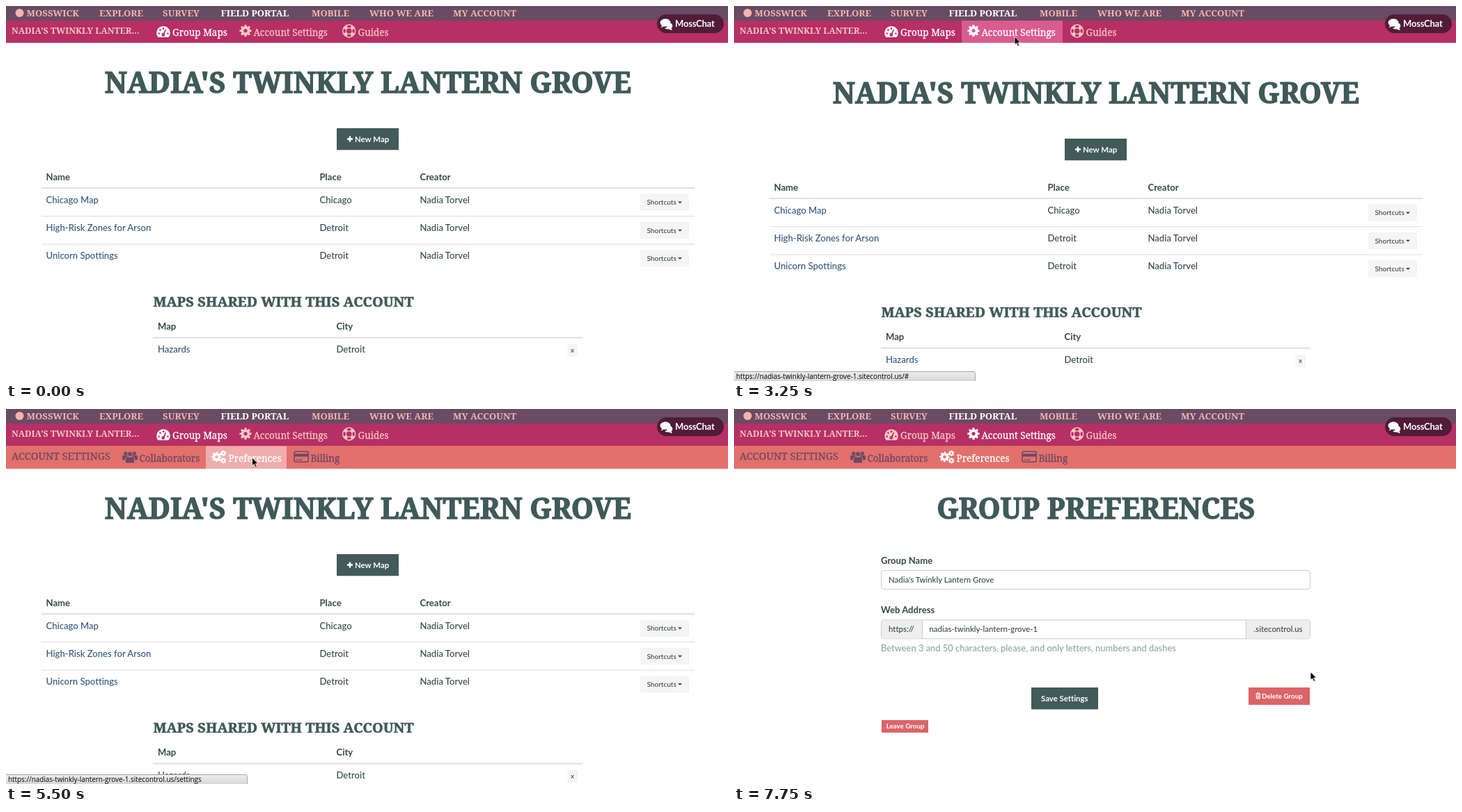
These frames come from a looping animation (1037x540 px, 8 s). An HTML page:

```html
<!DOCTYPE html>
<html lang="en">
<head>
<meta charset="utf-8">
<title>Group preferences</title>
<style>
html, body { margin: 0; width: 100%; height: 100%; overflow: hidden; background: #fff; }
svg.stage { display: block; width: 100vw; height: 100vh; }
text { white-space: pre; font-variant-ligatures: none; }

.slab { font-family: "Noto Serif", serif; font-size: 13.1px; }
.menu { font-weight: 700; fill: #f3b5ac; }
.menu .on { fill: #fff; }
.bar { fill: currentColor; font-size: 13.5px; }
.bar text { stroke: currentColor; stroke-width: .3px; }
.group { font-weight: 700; font-size: 12.4px; }
.title { font-weight: 700; font-size: 40.8px; text-anchor: middle; stroke-width: 1.3px; }
.sub { font-weight: 700; font-size: 20px; stroke-width: .6px; }
.title, .sub { fill: #3f5a59; stroke: #3f5a59; }
.lato { font-family: Lato, sans-serif; font-size: 13.1px; font-weight: 500; fill: #34494a; }
.b { font-weight: 700; }
.link { fill: #33587c; }
.field { font-size: 11.4px; }
.hint { fill: #8ca5a2; font-size: 12.9px; }
.btn { font-weight: 700; font-size: 11.4px; fill: #fff; }
.small { font-size: 9.8px; }
.url { font-family: "Open Sans", sans-serif; font-size: 9.9px; fill: #000; }
.rule { fill: #dcdcdc; }
.box { fill: #fff; stroke: #ccc; }
.dark { fill: #425a59; }
.red { fill: #db6468; }

.pink { color: #f6c6c1; }
.plum { color: #6d4865; }
.line { fill: none; stroke: currentColor; }

/* every change is a hard step on a 250 ms grid (3.125%) */
.anim { animation: 8s step-end infinite; }
.cursor { animation-name: cursor; }
.list { animation-name: list; }
.form { animation-name: form; }
.sub-bar { animation-name: sub-bar; }
.maps { animation-name: maps; }
.account { animation-name: account; }
.account-bg { animation-name: account-bg; }
.prefs { animation-name: prefs; }
.prefs-bg { animation-name: prefs-bg; }
.billing { animation-name: billing; }
.billing-bg { animation-name: billing-bg; }
.status { animation-name: status; }
.url-hash { animation-name: url-hash; }
.url-set { animation-name: url-set; }
.url-bill { animation-name: url-bill; }

@keyframes cursor {
  0% { visibility: hidden; transform: translate(533px, 19px); }
  6.25% { visibility: visible; transform: translate(533px, 19px); }
  9.375% { transform: translate(456px, 82px); }
  12.5% { transform: translate(406px, 67px); }
  15.625% { transform: translate(416px, 42px); }
  18.75% { transform: translate(419px, 38px); }
  21.875% { transform: translate(418.5px, 39px); }
  34.375% { transform: translate(409px, 43px); }
  37.5% { transform: translate(402.5px, 43.5px); }
  53.125% { transform: translate(376px, 57px); }
  56.25% { transform: translate(354.5px, 69px); }
  59.375% { transform: translate(353px, 69.5px); }
  90.625% { transform: translate(440px, 68px); }
  93.75% { transform: translate(827.5px, 377px); }
  96.875% { visibility: visible; transform: translate(827.5px, 378px); }
}
@keyframes list {
  0% { visibility: visible; transform: none; }
  40.625% { transform: translateY(15px); }
  43.75% { transform: translateY(31px); }
  46.875% { transform: translateY(33px); }
  75% { visibility: hidden; }
}
@keyframes form { 0% { visibility: hidden; } 75% { visibility: visible; } }
@keyframes sub-bar { 0% { opacity: 0; } 43.75% { opacity: .7; } 46.875% { opacity: 1; } }
@keyframes maps { 0% { color: #fff; } 75% { color: #f6c6c1; } }
@keyframes account {
  0% { color: #f6c6c1; }
  34.375% { color: #fae0dd; }
  37.5% { color: #fff; }
  56.25% { color: #f6cdc9; }
  59.375% { color: #f6c6c1; }
  75% { color: #fff; }
}
@keyframes account-bg {
  0% { opacity: 0; }
  34.375% { opacity: .08; }
  37.5% { opacity: .85; }
  40.625% { opacity: 1; }
  56.25% { opacity: .35; }
  59.375% { opacity: .1; }
  62.5% { opacity: 0; }
}
@keyframes prefs { 0% { color: #6d4865; } 56.25% { color: #fff; } }
@keyframes prefs-bg {
  0% { opacity: 0; }
  56.25% { opacity: .66; }
  59.375% { opacity: .85; }
  62.5% { opacity: .93; }
  65.625% { opacity: .97; }
  68.75% { opacity: 1; }
  93.75% { opacity: .4; }
  96.875% { opacity: 0; }
}
@keyframes billing {
  0% { color: #6d4865; }
  90.625% { color: #f6dcdb; }
  93.75% { color: #a5727f; }
  96.875% { color: #6d4865; }
}
@keyframes billing-bg {
  0% { opacity: 0; }
  90.625% { opacity: .08; }
  93.75% { opacity: .4; }
  96.875% { opacity: 0; }
}
@keyframes status {
  0% { opacity: 0; }
  34.375% { opacity: .6; }
  37.5% { opacity: 1; }
  96.875% { opacity: 0; }
}
@keyframes url-hash { 0% { visibility: visible; } 56.25% { visibility: hidden; } }
@keyframes url-set { 0% { visibility: hidden; } 56.25% { visibility: visible; } 90.625% { visibility: hidden; } }
@keyframes url-bill { 0% { visibility: hidden; } 90.625% { visibility: visible; } }
</style>
</head>
<body>
<svg class="stage" viewBox="0 0 1037 540" preserveAspectRatio="none">
  <defs>
    <linearGradient id="grey" x2="0" y2="1">
      <stop stop-color="#ededed"/><stop offset="1" stop-color="#d6d6d6"/>
    </linearGradient>
    <g id="gear" class="line">
      <circle r="4.6" stroke-width="4"/>
      <circle r="7.2" stroke-width="2.8" pathLength="16" stroke-dasharray="1 1" stroke-dashoffset=".5"/>
    </g>
    <g id="person" fill="currentColor">
      <circle r="3.6" cy="-4.6"/>
      <path d="M-6.5 7V3.5Q-6.5-1-3-1Q0 1 3-1Q6.5-1 6.5 3.5V7Q6.5 8.5 4.5 8.5H-4.5Q-6.5 8.5-6.5 7Z"/>
    </g>
    <g id="shortcuts">
      <rect x="911" y="270.5" width="70" height="24.5" fill="#f5f5f5"/>
      <text class="lato" x="920.5" y="286.3" style="font-size:10px">Shortcuts</text>
      <path d="M965 281.5h6l-3 3z" fill="#34494a"/>
    </g>
  </defs>
  <rect width="1037" height="540" fill="#fff"/>

  <g class="anim list">
    <text class="slab title" x="520" y="125.3">NADIA'S TWINKLY LANTERN GROVE</text>
    <rect class="dark" x="475" y="176" width="89" height="31.3"/>
    <path d="M490 191.5h8M494 187.5v8" stroke="#fff" stroke-width="2.4"/>
    <text class="lato btn" x="501" y="195.7">New Map</text>

    <g class="lato b">
      <text x="57.5" y="250.5">Name</text>
      <text x="450.5" y="250.5">Place</text>
      <text x="594.5" y="250.5">Creator</text>
      <text x="218" y="466">Map</text>
      <text x="474.5" y="466">City</text>
    </g>
    <g class="rule">
      <rect x="51" y="261.3" width="938" height="1.7"/>
      <rect x="51" y="302.2" width="938" height="1"/>
      <rect x="51" y="342.6" width="938" height="1"/>
      <rect x="211" y="476.8" width="617" height="1.7"/>
    </g>
    <g class="lato">
      <text class="link" x="57.5" y="283.7">Chicago Map</text>
      <text x="450.5" y="283.7">Chicago</text>
      <text x="594.5" y="283.7">Nadia Torvel</text>
      <text class="link" x="57.5" y="324">High-Risk Zones for Arson</text>
      <text x="450.5" y="324">Detroit</text>
      <text x="594.5" y="324">Nadia Torvel</text>
      <text class="link" x="57.5" y="364.3">Unicorn Spottings</text>
      <text x="450.5" y="364.3">Detroit</text>
      <text x="594.5" y="364.3">Nadia Torvel</text>
      <text class="link" x="218" y="499">Hazards</text>
      <text x="474.5" y="499">Detroit</text>
    </g>
    <use href="#shortcuts"/>
    <use href="#shortcuts" y="40.3"/>
    <use href="#shortcuts" y="80.6"/>
    <text class="slab sub" x="211.5" y="432.7">MAPS SHARED WITH THIS ACCOUNT</text>
    <rect x="806" y="487" width="15" height="17.5" fill="#f5f5f5"/>
    <text class="lato" x="813.5" y="499" text-anchor="middle" style="font-size:10px">x</text>
  </g>

  <g class="anim form">
    <text class="slab title" x="520" y="158.3">GROUP PREFERENCES</text>
    <text class="lato b" x="211" y="222.5">Group Name</text>
    <rect class="box" x="211.5" y="232.5" width="616" height="27" rx="3.5"/>
    <text class="lato b" x="211" y="294">Web Address</text>
    <rect class="box" x="211.5" y="303.8" width="616" height="27" rx="3.5"/>
    <path d="M270 304.3h-55q-3 0-3 3v20q0 3 3 3h55zM736 304.3h88q3 0 3 3v20q0 3-3 3h-88z" fill="#eee"/>
    <path d="M270.5 304v27M735.5 304v27" stroke="#ccc"/>
    <g class="lato field">
      <text x="222" y="250">Nadia's Twinkly Lantern Grove</text>
      <text x="222" y="321.3">https://</text>
      <text x="280.5" y="321.3">nadias-twinkly-lantern-grove-1</text>
      <text x="746.5" y="321.3">.sitecontrol.us</text>
    </g>
    <text class="lato hint" x="211" y="349.4">Between 3 and 50 characters, please, and only letters, numbers and dashes</text>
    <rect class="dark" x="427" y="401" width="96" height="31.5"/>
    <text class="lato btn" x="441" y="420.8">Save Settings</text>
    <rect class="red" x="739" y="401" width="88" height="25"/>
    <path d="M749 410.5h7.5M751.3 410v-1.2h3v1.2M750.3 411.5v5.6h5v-5.6M752 412v4.5M753.7 412v4.5" fill="none" stroke="#fff"/>
    <text class="lato btn small" x="758" y="416.8">Delete Group</text>
    <rect class="red" x="212" y="448" width="67" height="18"/>
    <text class="lato btn small" x="218.7" y="460.4">Leave Group</text>
  </g>

  <g class="anim sub-bar slab">
    <rect y="53" width="1037" height="33" fill="#e2706c"/>
    <rect class="anim prefs-bg" x="287" y="53.5" width="116" height="32.5" fill="#efadab"/>
    <rect class="anim billing-bg" x="405" y="53.5" width="82" height="32.5" fill="#efadab"/>
    <g class="bar plum">
      <text x="8" y="72.6" style="font-size:14.5px">ACCOUNT SETTINGS</text>
      <use href="#person" transform="translate(171.8 67.3) scale(.72)"/>
      <use href="#person" transform="translate(184.2 67.3) scale(.72)"/>
      <use href="#person" transform="translate(178 69.5)" stroke="#e2706c"/>
      <text x="191.5" y="75.6">Collaborators</text>
    </g>
    <g class="bar anim prefs">
      <use href="#gear" transform="translate(302.5 69) scale(.86)"/>
      <use href="#gear" transform="translate(312.2 63.7) scale(.5)"/>
      <use href="#gear" transform="translate(312.2 74.3) scale(.5)"/>
      <text x="319.5" y="75.6">Preferences</text>
    </g>
    <g class="bar anim billing">
      <rect class="line" x="414.2" y="61.2" width="20" height="15" rx="1.5" stroke-width="1.6"/>
      <path d="M414 64.5h20.5v4H414zM416.5 72.5h2.5v1.5h-2.5zM420.5 72.5h4.5v1.5h-4.5z"/>
      <text x="437.5" y="75.6">Billing</text>
    </g>
  </g>

  <g class="slab">
    <rect width="1037" height="21" fill="#694b64"/>
    <g class="menu">
      <circle cx="19.5" cy="10" r="6"/>
      <text x="29.5" y="14.7">MOSSWICK</text>
      <text x="134" y="14.7">EXPLORE</text>
      <text x="225" y="14.7">SURVEY</text>
      <text class="on" x="308.5" y="14.7">FIELD PORTAL</text>
      <text x="439" y="14.7">MOBILE</text>
      <text x="522" y="14.7">WHO WE ARE</text>
      <text x="642" y="14.7">MY ACCOUNT</text>
    </g>
    <rect y="21" width="1037" height="32" fill="#b62f65"/>
    <rect class="anim account-bg" x="327" y="21" width="145" height="32" fill="#da5b8f"/>
    <text class="bar group pink" x="8" y="39.5">NADIA'S TWINKLY LANTER...</text>
    <g class="bar anim maps">
      <path d="M218.5 45A9.8 9.8 0 1 1 233.5 45Z"/>
      <g fill="#b62f65">
        <circle cx="219.6" cy="39.5" r="1.3"/><circle cx="221.5" cy="34.6" r="1.3"/>
        <circle cx="226" cy="32.4" r="1.3"/><circle cx="232.4" cy="39.5" r="1.3"/>
        <circle cx="225.8" cy="41.5" r="2.4"/>
        <path d="M225.2 41l3.5-7.5 1.4.5-2.8 7.5z"/>
      </g>
      <text x="239" y="43">Group Maps</text>
    </g>
    <g class="bar anim account">
      <use href="#gear" x="344" y="35.6"/>
      <text x="355.5" y="43">Account Settings</text>
    </g>
    <g class="bar pink">
      <g class="line">
        <circle cx="492.7" cy="36" r="9" stroke-width="1.4"/>
        <circle cx="492.7" cy="36" r="4.4" stroke-width="1.3"/>
        <circle cx="492.7" cy="36" r="6.7" stroke-width="4" pathLength="8" stroke-dasharray="1 1" stroke-dashoffset="-.5"/>
      </g>
      <text x="505.5" y="43">Guides</text>
    </g>
  </g>

  <rect x="935" y="12" width="96" height="27" rx="13.5" fill="#501c38"/>
  <g fill="#fff">
    <path d="M950 23.5q7 .5 7.3 5q0 2.5-1.8 3.8l1.5 2.5q-3 0-4.5-1.5q-4 .6-6.5-1.3q6-1.5 4-8.5z"/>
    <path d="M947 18.5c4.5 0 7.5 2.5 7.5 5.5s-3 5.5-7.5 5.5q-1.200 0-2.3-.3q-1.7 1.8-4.2 1.8q1.5-1.2 1.5-2.8q-2.5-1.7-2.5-4.2c0-3 3-5.5 7.5-5.5z"/>
  </g>
  <text class="lato btn" x="961" y="30.3" style="font-size:13px;letter-spacing:-.2px">MossChat</text>

  <g class="anim status">
    <path d="M-1 526.5H344q2.5 0 2.5 2.5V541H-1z" fill="url(#grey)" stroke="#a6a6a6"/>
    <g class="url">
      <text class="anim url-hash" x="3" y="536.8">https://nadias-twinkly-lantern-grove-1.sitecontrol.us/#</text>
      <text class="anim url-set" x="3" y="536.8">https://nadias-twinkly-lantern-grove-1.sitecontrol.us/settings</text>
      <text class="anim url-bill" x="3" y="536.8">https://nadias-twinkly-lantern-grove-1.sitecontrol.us/settings/billing</text>
    </g>
  </g>

  <path class="anim cursor" d="M.5.5V12.3L3.2 9.8 5.3 14.5 7.3 13.6 5.3 9.1H9z" fill="#000" stroke="#fff" stroke-width=".8"/>
</svg>
</body>
</html>
```
